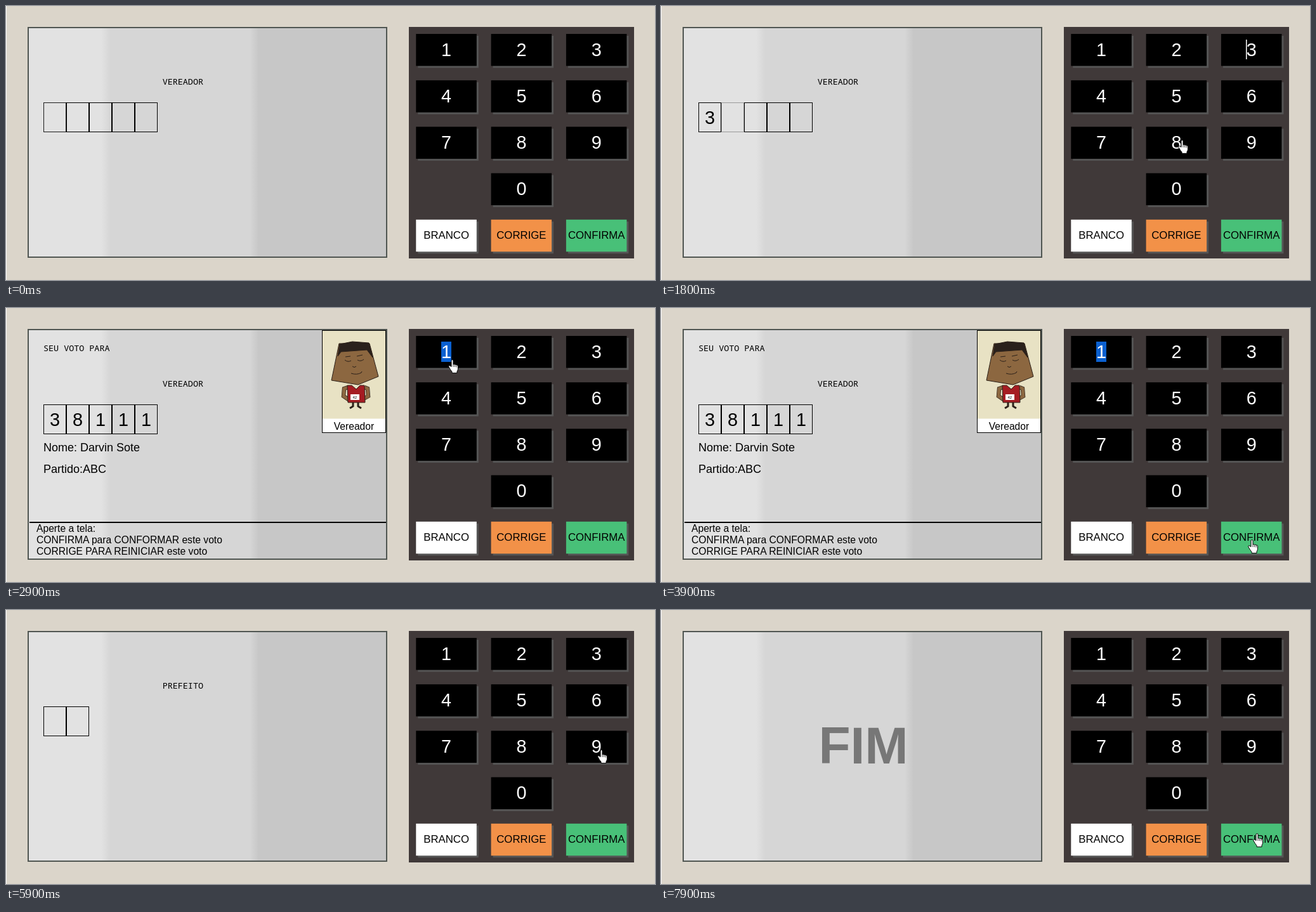
Animation of 1023 by 432 pixels, one loop 8000 ms. Source, as an HTML page:

```html
<!DOCTYPE html>
<html lang="pt">
<head>
<meta charset="utf-8">
<title>Urna</title>
<style>
html, body { margin: 0; height: 100%; overflow: hidden; background: #dbd5ca; }
svg { display: block; width: 1023px; height: 432px; font-family: "Liberation Sans", Arial, sans-serif; }
.mid { text-anchor: middle; }
.mono { font: 13.4px "Noto Sans Mono", monospace; }
</style>
</head>
<body>
<svg viewBox="0 0 1023 432">
  <defs>
    <linearGradient id="glass">
      <stop offset=".204" stop-color="#e2e2e2"/><stop offset=".229" stop-color="#d6d6d6"/>
      <stop offset=".618" stop-color="#d6d6d6"/><stop offset=".643" stop-color="#c7c7c7"/>
    </linearGradient>
  </defs>
  <rect width="1" height="432" fill="#fff"/>
  <rect x="35" y="34" width="565" height="362" fill="url(#glass)" stroke="#505652" stroke-width="2"/>
  <rect x="635" y="33" width="355" height="365" fill="#403939"/>
  <g id="keys"></g>
  <g id="live"></g>
</svg>
<script>
const LOOP = 8000, STEP = 100;
const MAYOR_AT = 4300, END_AT = 7900;
const $ = id => document.getElementById(id);

const rect = (x, y, w, h, fill, extra = '') =>
  `<rect x="${x}" y="${y}" width="${w}" height="${h}" fill="${fill}" ${extra}/>`;
const text = (x, y, size, s, extra = '') =>
  `<text x="${x}" y="${y}" font-size="${size}" ${extra}>${s}</text>`;
const path = (d, fill = 'none', stroke = '#2b2019', width = 1) =>
  `<path d="${d}" fill="${fill}" stroke="${stroke}" stroke-width="${width}"/>`;
const centered = (x, y, size, s, fill = '#000') => text(x, y, size, s, `class="mid" fill="${fill}"`);
const mono = (x, y, s) => `<text x="${x}" y="${y}" class="mono">${s}</text>`;

// Keypad
const KEY_W = 95.5, KEY_H = 50.5;
const special = { BRANCO: '#fff', CORRIGE: '#f29148', CONFIRMA: '#48c078' };
const keys = [...'123456789', '', '0', '', ...Object.keys(special)]
  .map((label, i) => ({ label, x: 646.3 + i % 3 * 118.3, y: 44 + Math.floor(i / 3) * 73.2 }))
  .filter(k => k.label);

$('keys').innerHTML = keys.map(({ label, x, y }) => {
  const fill = special[label];
  return rect(x + 3, y + 3, KEY_W, KEY_H, '#555') + rect(x, y, KEY_W, KEY_H, fill || '#000') +
    (fill ? centered(x + 47.8, y + 30, 16.8, label) : centered(x + 47.8, y + 34.5, 28.8, label, '#fff'));
}).join('');

// Portraits, drawn in a 99 x 138 box
const limbs = (d, color, width = 5) => path(d, 'none', '#2b2019', width + 1.4) + path(d, 'none', color, width);
const feet = path('M48 112v7l-5 3M56 112v7l5 3', 'none', '#2b2019', 3);
const arms = 'M40 89l-6 2-1 12 9 6M66 89l5 2 1 12-9 5';

const bodies = {
  runner: skin => feet + limbs(arms, skin) +
    path('M39 86L46 86 53 92 59 86 66 86 67 113 40 113Z', '#a51c22') +
    rect(44, 100, 14, 9, '#fff') + text(47.5, 107, 6, '42'),
  boxer: skin => feet + limbs(arms, skin) + path('M38 87H67L62 111H42Z', skin) +
    path('M45 94q7 4 14 0M52 90v18M45 100h14') + path('M41 108H63L62 117 53 114 43 117Z', '#1d3a8c') +
    path('M31 106q9-3 11 3t-7 9q-6-2-4-12ZM71 106q-9-3-10 3t6 9q6-2 4-12Z', '#dc2a20'),
  lifter: skin => feet + path('M8 91H94', 'none', '#555', 2) +
    limbs('M37 93l-9 9-5-11M66 93l9 9 4-11', skin) +
    path('M35 93H46L52 98 58 93H67L63 117 53 111 41 118Z', '#b01824') +
    rect(7, 83, 5, 18, '#456a9c', 'stroke="#222"') + rect(90, 83, 5, 18, '#456a9c', 'stroke="#222"')
};
const hairs = {
  flat: 'M24 40L27 21 47 17 73 19 79 42 70 30 29 33Z',
  swept: 'M24 46L26 20 46 13 72 8 79 42 69 24 46 27 32 30Z'
};

const portrait = (x, y, scale, skin, hairColor, hair, body) =>
  `<g transform="translate(${x} ${y}) scale(${scale})">` + rect(0, 0, 99, 138.5, '#e8e2c4') +
  bodies[body](skin) + path('M26 20L74 20 88 72 56 85 14 78Z', skin) + path(hairs[hair], hairColor) +
  path('M35 46q5 4 10 1M55 46q5 3 10-1M36 41l8-1M54 40l9-2M47 56q3 3 6 0M45 67q9 3 16-1l1-2') + '</g>';

const card = (x, y, w, h, label, size, base, picture) =>
  rect(x + .5, y + .5, w - 1, h - 1, '#fff', 'stroke="#000"') + picture + centered(x + w / 2, base, size, label);

// Voting rounds
const council = {
  office: 'VEREADOR', digits: '38111', typed: [1400, 2200, 2600, 2700, 2900], start: -150, name: 'Darvin Sote',
  cards: card(498, 35, 101, 162, 'Vereador', 15.65, 192,
    portrait(499, 36, 1, '#8c6740', '#2a211c', 'flat', 'runner'))
};
const mayor = {
  office: 'PREFEITO', digits: '99', typed: [6000, 6200], start: 4600, name: 'Tarvino',
  cards: card(498, 35, 101, 162, 'Prefeito', 15.65, 192,
    portrait(499, 36, 1, '#b8844a', '#2b2a22', 'flat', 'boxer')) +
    card(516, 197, 83, 130, 'Vice-Prefeito', 11.3, 324,
      portrait(517, 198, .822, '#d8ba8a', '#6a3214', 'swept', 'lifter'))
};

const details = round =>
  mono(59, 68, 'SEU VOTO PARA') + text(59, 226, 18, 'Nome: ' + round.name) +
  text(59, 260, 18, 'Partido:ABC') + round.cards + rect(37, 337, 562, 2, '#000') +
  ['Aperte a tela:', 'CONFIRMA para CONFORMAR este voto', 'CORRIGE PARA REINICIAR este voto']
    .map((line, i) => text(48, 353 + 18 * i, 15.65, line)).join('');

function screen(t) {
  if (t >= END_AT) return centered(319, 242, 82, 'FIM', '#777').replace('<text', '<text font-weight="bold"');
  const round = t >= MAYOR_AT ? mayor : council;
  const count = round.typed.filter(at => t >= at).length;
  const since = count ? round.typed[count - 1] : round.start;
  const blink = .5 + .5 * Math.cos((t - since) / 1300 * 2 * Math.PI);
  const cells = [...round.digits].map((digit, i) =>
    rect(59.5 + 36 * i, 152.5, 35, 46, 'none', `stroke="#000" opacity="${i === count ? blink : 1}"`) +
    (i < count ? centered(77 + 36 * i, 185.5, 28.8, digit) : '')).join('');
  return mono(246.7, 124, round.office) + cells + (count === round.digits.length ? details(round) : '');
}

// Text caret and selection left behind by clicks: from, to, x
const carets = [[1200, 2000, 922], [2000, 2400, 820], [2400, 2700, 700.5]];

function marks(t) {
  if (t >= 2700 && t < MAYOR_AT) return rect(686, 53, 16, 32, '#0a60d0') + centered(694, 78.5, 28.8, '1', '#fff');
  const caret = carets.find(([from, to]) => t >= from && t < to);
  return caret ? rect(caret[2], 53 + (caret[2] === 820 ? 146 : 0), 1.5, 31, '#fff') : '';
}

// Pointer hot spot: time, x, y
const route = [
  [100, 940, 10], [900, 930, 76], [1300, 930, 76], [1900, 812, 222], [2300, 812, 222], [2400, 703, 81],
  [3400, 703, 81], [3900, 931, 365], [4500, 931, 365], [5500, 932, 78], [5700, 938, 220], [6200, 938, 220],
  [6500, 1003, 355], [7100, 1003, 355], [7200, 1007, 355], [7400, 939, 352], [LOOP, 939, 352]
];
const hand = path('M6.5.5q1.5 0 1.5 1.5v6q1-1 2.5 .3q1.3-.8 2.5 .6q2.5-.6 2.5 2v4q0 2-1.5 4v2.5h-8v-2' +
  'q-2-2-5-7.5q-1-2 .8-2.2q1.2 0 3.2 1.8v-9.5q0-1.5 1.5-1.5z', '#fff', '#000') +
  path('M8 8v4M10.7 8.5v3.5M13.2 9.5v3', 'none', '#000', .8);
const arrow = path('M.5 .7V16.2L4 12.8 6.4 18.3 8.8 17.3 6.4 11.9H11.3Z', '#fff', '#000');

function pointer(t) {
  if (t < route[0][0]) return '';
  const i = route.findIndex(p => p[0] > t);
  const [t0, x0, y0] = route[i - 1], [t1, x1, y1] = route[i];
  const u = (t - t0) / (t1 - t0), k = u * u * (3 - 2 * u);
  const x = x0 + (x1 - x0) * k, y = y0 + (y1 - y0) * k;
  const over = keys.some(b => x >= b.x && x <= b.x + KEY_W && y >= b.y && y <= b.y + KEY_H);
  return `<g transform="translate(${Math.round(x) - (over ? 6 : 0)} ${Math.round(y)})">${over ? hand : arrow}</g>`;
}

let shown = -1;
const began = performance.now();
function tick() {
  const t = Math.floor((performance.now() - began) % LOOP / STEP) * STEP;
  if (t !== shown) $('live').innerHTML = screen(t) + marks(t) + pointer(t);
  shown = t;
  requestAnimationFrame(tick);
}
tick();
</script>
</body>
</html>
```
